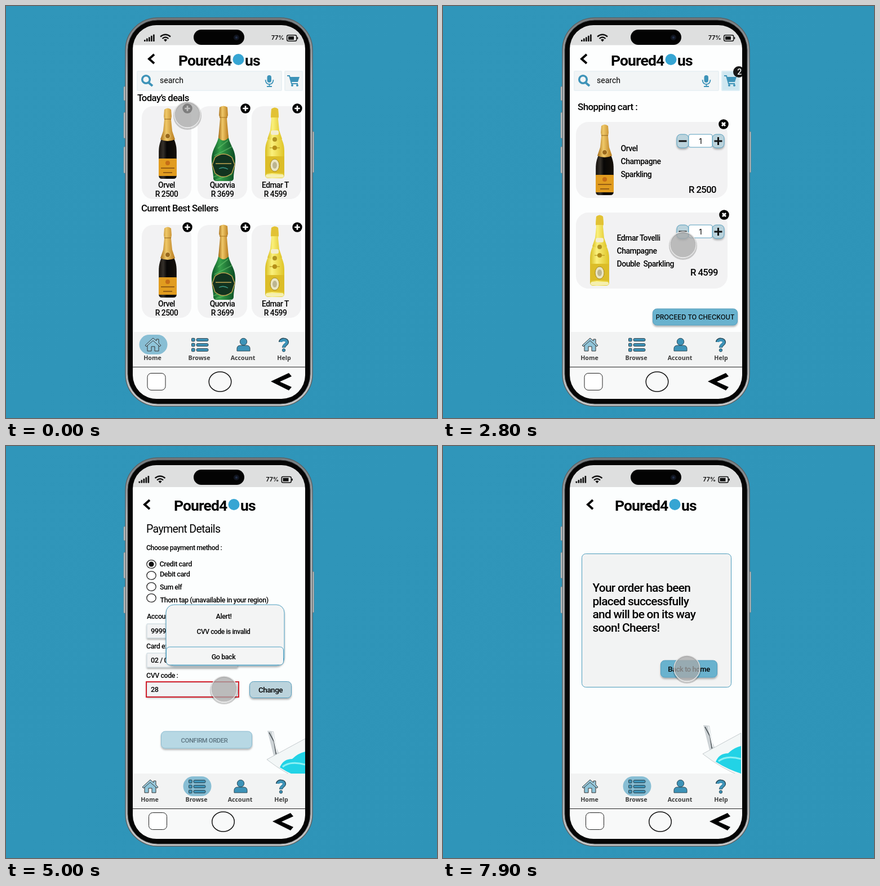
An HTML page for the animation above (8000 ms loop, 765x732 px).

```html
<!DOCTYPE html>
<html lang="en">
<head>
<meta charset="utf-8">
<style>
html, body { margin: 0; width: 100%; height: 100%; overflow: hidden; background: #2f95b9; }
svg { display: block; width: 100vw; height: 100vh; }
text { font-family: Roboto, "Liberation Sans", sans-serif; letter-spacing: -.035em; white-space: pre; }
.ui { font-family: Inter, sans-serif; letter-spacing: 0; }
.nav { font-family: "Noto Sans", sans-serif; letter-spacing: 0; }
</style>
</head>
<body>
<svg id="stage" viewBox="0 0 765 732"></svg>
<script>
const BLUE = '#3d93b8', PALE = '#bbd3dc', EDGE = '#559dbd', CARD = '#f2f2f3';

// Drawing helpers, all returning SVG markup
const rect = (x, y, w, h, r, fill, more = '') =>
  `<rect x="${x}" y="${y}" width="${w}" height="${h}" rx="${r}" fill="${fill}" ${more}/>`;
const circle = (x, y, r, fill, more = '') => `<circle cx="${x}" cy="${y}" r="${r}" fill="${fill}" ${more}/>`;
const path = (d, fill, more = '') => `<path d="${d}" fill="${fill}" ${more}/>`;
const line = (d, color, w, more = '') => path(d, 'none', `stroke="${color}" stroke-width="${w}" ${more}`);
const text = (x, y, size, str, weight = 500, more = '') =>
  `<text x="${x}" y="${y}" font-size="${size}" font-weight="${weight}" ${more}>${str}</text>`;
const mid = (x, y, size, str, weight = 500, more = '') =>
  text(x, y, size, str, weight, 'text-anchor="middle" ' + more);
const use = (id, x, y) => `<use href="#${id}" x="${x}" y="${y}"/>`;
const move = (x, y, body) => `<g transform="translate(${x} ${y})">${body}</g>`;
const stroke = (c, w = 1) => `stroke="${c}" stroke-width="${w}"`;
const SHADOW = 'filter="url(#shadow)"';

const glassBody = 'M-8 46C-15 60-17 66-17 78V119Q-17 125-11 125H11Q17 125 17 119V78C17 66 15 60 8 46Z';
const foil = 'M-6 2Q0-3 6 2L7 14 6 20 8 40 13 55Q0 61-13 55L-8 40-6 20-7 14Z';

const defs = `<defs>
<filter id="shadow" x="-30%" y="-30%" width="160%" height="170%">
  <feDropShadow dx="0" dy="2.5" stdDeviation="1.5" flood-opacity=".3"/></filter>
<linearGradient id="bg" x2="1" y2="1"><stop stop-color="#3096ba"/><stop offset="1" stop-color="#2e94b8"/></linearGradient>
<linearGradient id="metal" x2="0" y2="1"><stop stop-color="#777c7f"/><stop offset=".15" stop-color="#b3b7b9"/>
  <stop offset=".85" stop-color="#a8acae"/><stop offset="1" stop-color="#c6c8c9"/></linearGradient>
<linearGradient id="gold"><stop stop-color="#a56b16"/><stop offset=".4" stop-color="#efc868"/><stop offset="1" stop-color="#b77a1c"/></linearGradient>
<linearGradient id="dark"><stop stop-color="#15110c"/><stop offset=".25" stop-color="#35302a"/><stop offset=".45" stop-color="#080706"/><stop offset="1" stop-color="#151009"/></linearGradient>
<linearGradient id="green"><stop stop-color="#0c5427"/><stop offset=".35" stop-color="#36a04a"/><stop offset="1" stop-color="#0b4b23"/></linearGradient>
<linearGradient id="lemon"><stop stop-color="#d8bd20"/><stop offset=".35" stop-color="#faf07c"/><stop offset="1" stop-color="#dfc426"/></linearGradient>
<clipPath id="screen">${rect(225, 34, 306, 664, 42, '#000')}</clipPath>
<g id="b0">
  <g transform="scale(.93 1)">${path(glassBody, 'url(#dark)')}</g>${path(foil, 'url(#gold)')}
  ${line('M-6 19H6', '#8d5e18', 1)}${circle(0, 49, 4.5, '#9a691d', stroke('#f0cf7c'))}
  ${rect(-16, 89, 32, 31, 1, '#e19c1f')}${circle(0, 97, 4, '#c56d16')}
  ${line('M-12 106H12M-8 114H8', '#7d4a12', 1.3)}
</g>
<g id="b1">
  ${path('M-8 50C-10 70-22 75-21 98-20 114-18 118-18 128Q-18 133-12 133H12Q18 133 18 128C18 118 20 114 21 98 22 75 10 70 8 50Z', 'url(#green)')}
  ${line('M-10 75 8 61M-16 88 15 72M-18 126 16 112M-14 131 15 121', '#64c06b', 1.8, 'opacity=".6"')}
  ${path('M-7 2Q0-3 7 2L8 16 6 22 9 56Q0 66-9 56L-6 22-8 16Z', 'url(#gold)')}
  ${line('M-7 20H7', '#a97420', 1)}
  ${path('M-20 104L-15 91Q0 79 15 91L20 104 15 119Q0 132-15 119Z', '#12331f', stroke('#c2a452', 1.4))}
  ${line('M-14 102H14', '#c2a452', 1.5)}${line('M-8 111Q0 107 8 112', '#3f9f8f', 1.3)}
</g>
<g id="b2">
  ${path(glassBody, 'url(#lemon)')}${path(foil, 'url(#lemon)')}
  ${path('M-6 2Q0-3 6 2L7 17H-7Z', '#e2c235')}${rect(-7, 40, 14, 8, 3, '#f3edcf')}
  ${circle(0, 56, 4, '#b19420')}${line('M-9 71H9', '#ad8b13', 1)}${circle(0, 71, 4, '#b58f17')}
  ${rect(-17, 86, 34, 30, 0, '#dcbd28')}<ellipse cy="102" rx="8" ry="11" fill="#eae5c2" stroke="#a58a24"/>
  <ellipse cy="102" rx="4" ry="6" fill="#bcb590"/>${rect(-16, 118, 32, 6, 3, '#f5efb0')}
</g>
<g id="add">${circle(0, 0, 8.7, '#000')}${line('M-4.8 0H4.8M0-4.8V4.8', '#fff', 2.7)}</g>
<g id="del">${circle(0, 0, 8.8, '#000')}${line('M-3-3 3 3M3-3-3 3', '#fff', 3)}</g>
<g id="pour">
  ${path('M464 506L475 507 480 536 487 552 476 554Z', '#ccd2d5')}${line('M467 509L476 526 480 551', '#454d51', 1.6)}
  ${line('M473 508L481 545', '#f4f7f8', 2)}
  ${path('M463 557L531 520V597Q495 582 463 557Z', '#f3f7f7', stroke('#c3cacd'))}
  ${path('M486 571Q492 556 508 556 518 546 531 543V592Q506 584 486 571Z', '#22d3e6')}
  ${line('M491 570Q505 559 531 566', '#8cf0f4', 3)}
</g>
</defs>`;

const chevron = (x, y) => line(`M${x + 5} ${y - 8}L${x - 4} ${y}L${x + 5} ${y + 8}`, '#000', 3.9);

const status = (dx, dy) => move(dx, dy,
  [0, 1, 2, 3, 4].map(i => rect(245 + i * 4, 60 - i * 2.4, 2.7, 3 + i * 2.4, .6, '#111')).join('') +
  line('M274 54.5Q283 47 292 54.5M277.5 58Q283 53 288.5 58', '#111', 2.3) + path('M280 60Q283 57.5 286 60L283 63.5Z', '#111') +
  text(471, 60, 10.5, '77%', 600, 'class="ui"') +
  rect(498.7, 51.7, 17, 10.5, 2.5, 'none', stroke('#111', 1.5)) + rect(501, 54, 10, 6, .5, '#111') + rect(516.5, 55, 1.8, 4, .8, '#111'));

const title = (x, y) => text(x, y, 26.5, 'Poured4', 600) + circle(x + 106.5, y - 11, 10, '#36a5d3') + text(x + 118, y, 26.5, 'us', 600);

const tabs = [['Home', 260, 261], ['Browse', 343, 344], ['Account', 420.5, 421.5], ['Help', 493.5, 493]];
const icons = [
  path('M-10 0V11H-3V3H3V11H10V0L0-9Z', '#8fc5da', stroke('#333')) +
    path('M0-12L6-7V-10H10V-3L14 1 12 3 0-7.5-12 3-14 1Z', '#9acbde', stroke('#333')),
  [-9, 0, 9].map(y => rect(-14.5, y - 2.7, 5.5, 5.5, 1, BLUE, stroke('#2c3d45')) + rect(-6, y - 2.3, 21, 4.7, 2, BLUE, stroke('#2c3d45'))).join(''),
  circle(0, -5.5, 6.2, BLUE, stroke('#2c4a57')) + path('M-11.5 11V6Q-11 1-5 1H5Q11 1 11.5 6V11Z', BLUE, stroke('#2c4a57')),
  line('M-6-5C-6-11 7-11 6-4 5 0 0 0 0 5', '#2c4a57', 6) + line('M-5.5-5C-5-10 6-10 5.5-4 4.5-1 0 0 0 4.5', BLUE, 4.6) + circle(0, 9.5, 2.7, BLUE, stroke('#2c4a57'))
];

const footer = (pill, dx, late) => {
  const y = late ? 3 : 0;
  return rect(225, 579 + y, 306, 63, 0, '#f2f3f3') +
    move(dx, y, (pill < 0 ? '' : rect(tabs[pill][2] - 24.5, 584, 50, 35, 17.5, '#88bed4')) +
      tabs.map(([name, x, ix], i) => move(ix, 602, icons[i]) + mid(x, 629, 10.7, name, 600, 'class="nav" fill="#3b3b3b"')).join('')) +
    rect(225, 641 + y, 306, 60, 0, '#f8f9f9') + rect(225, 641 + y, 306, 1, 0, '#222') +
    rect(late ? 253.5 : 251, late ? 651.5 : 652.5, 32, 30, 7, '#fff', stroke('#222')) +
    `<ellipse cx="${late ? 385.5 : 380}" cy="667.5" rx="19.8" ry="17.5" fill="none" stroke="#111" stroke-width="1.5"/>` +
    path('M470 667L502 652 507 658 486 667.5 507 677 502 683Z', '#000', late ? 'transform="translate(3 0)"' : '');
};

const searchBar = (badge = 0) =>
  rect(233, 116, 256, 34, 1, '#f2f5f6', stroke('#eaf1f4', 2)) +
  rect(495, 116, 31, 34, 1, badge ? '#cfe7f0' : '#f2f5f6', stroke(badge ? '#dceef5' : '#eaf1f4', 2)) +
  circle(248.5, 130.5, 6.8, 'none', stroke(BLUE, 3.5)) + line('M253 136L260 142', BLUE, 4) +
  text(273, 137, 14, 'search', 400, 'style="letter-spacing:0"') +
  rect(463.5, 123, 7.5, 13, 3.7, BLUE) + line('M460.5 131Q461 139 467.5 139 474 139 474.5 131M467.5 139V143M463 143H472', BLUE, 1.8) +
  path('M504 126H521L518 135H506Z', BLUE) + line('M499 124H503L507 138H518', BLUE, 2) +
  circle(508, 141, 2, BLUE) + circle(517, 141, 2, BLUE) +
  (badge ? circle(525, 117, 10, '#161616') + mid(526, 122, 14, badge, 500, 'fill="#fff"') : '');

const shopPage = (body, { pill = -1, x = 298, back = 250, badge } = {}) =>
  rect(225, 69, 306, 511, 0, '#fdfefe') + rect(225, 34, 306, 35.5, 0, '#dedfdf') + status(0, 0) +
  chevron(back, 94) + title(x, 106) + searchBar(badge) + body + footer(pill, 0, false);

const payPage = (body, pill, dx, back, x, pourX, pourY) =>
  rect(225, 73, 306, 511, 0, '#fcfefe') + rect(225, 34, 306, 39, 0, '#dedfdf') + status(-9.5, 2.7) +
  chevron(back, 104) + title(x, 115) + use('pour', pourX, pourY) + body + footer(pill, dx, true);

const button = (x, y, w, h, fill, label, size, more = '') =>
  rect(x, y, w, h, 7, fill, `${stroke(EDGE)} ${SHADOW}`) + mid(x + w / 2, y + h / 2 + size * .36, size, label, 500, more);

const names = ['Orvel', 'Quorvia', 'Edmar T'], prices = ['R 2500', 'R 3699', 'R 4599'];
const shelf = (dx, dy) => move(dx, dy, [241, 340, 436, 529].map(x => rect(x, 178, 88, 165, 20, CARD)).join('') +
  names.map((name, i) => use('b' + i, [287, 386, 477][i], [182, 178, 181][i]) +
    mid([285, 384, 478][i], 323, 13.8, name) + mid([285, 384, 478][i], 339, 13.8, prices[i]) +
    use('add', [322, 425, 517][i], 182)).join(''));

const stepper = (x, y, bw, w, h) =>
  rect(x, y, bw, h, 7, PALE, `${stroke(EDGE)} ${SHADOW}`) + rect(x + bw + w, y, bw, h, 7, PALE, `${stroke(EDGE)} ${SHADOW}`) +
  rect(x + bw, y, w, h - 1, 3, '#fff', stroke(EDGE)) + mid(x + bw + w / 2, y + h / 2 + 4.5, 13.5, '1', 400, 'class="ui"') +
  line(`M${x + bw / 2 - 7} ${y + h / 2}h14M${x + bw * 1.5 + w - 7} ${y + h / 2}h14m-7-7v14`, '#111', 3);

const list = badge => shopPage(rect(237, 160, 127, 29, 8, PALE, `${stroke(EDGE)} ${SHADOW}`) +
  line('M247 170L252 175 247 180M254 170L259 175 254 180', '#111', 2.4) + text(263, 181, 16.7, 'Champagnes') +
  shelf(-1, 24) + shelf(-5, 205), { pill: 0, x: 299, back: 251, badge });

const modal = rect(251, 223.5, 264, 281, 14, '#f3f4f5', `${stroke(EDGE)} ${SHADOW}`) +
  mid(378.5, 246, 16.2, 'Add to cart?') + use('b0', 376, 253) +
  mid(376.5, 404, 14, names[0]) + mid(377, 422, 14, 'Sparkling Chamapagne') + mid(376.5, 439, 14, prices[0]) +
  stepper(267.5, 459, 25, 53, 24) + button(386, 456, 57, 30, '#80bbd2', 'Add', 12.3, 'class="ui"') +
  button(449, 455.5, 58, 30, PALE, 'Cancel', 12, 'class="ui"');

const lines = (x, y, gap, size, rows, weight) => rows.map((s, i) => text(x, y + i * gap, size, s, weight)).join('');
const basket = (heading, x2, y2, action) => text(239, 185, 17, heading) +
  rect(236, 206, 269, 135, 22, CARD) + rect(x2, y2, 269, 135, 22, CARD) +
  use('b0', 287, 211) + use('b2', 278, y2 + 5) +
  lines(315.5, 258, 23, 14, [names[0], 'Champagne', 'Sparkling']) +
  lines(308.5, y2 + 50, 23, 14, ['Edmar Tovelli', 'Champagne', 'Double  Sparkling']) +
  text(436, 332, 16.7, prices[0]) + text(439, y2 + 112, 16.7, prices[2]) +
  button(372.5, 538, 150, 29, '#69b2ce', action, 11.4, 'class="ui"');

const payment = done => {
  const off = done ? 400 : 500;
  const field = (y, value) => rect(250, y, 161, 25, 1, '#f2f3f4', `${stroke('#c4d4db')} ${SHADOW}`) + text(257, y + 17, 12.7, value);
  const change = done ? rect(432, 418, 75, 29, 0, '#7ccde1', `${stroke('#35abc9')} ${SHADOW}`) + mid(469.5, 438, 13.5, 'Change', 500, 'fill="#23697e"')
    : button(432.5, 418.5, 74, 29, PALE, 'Change', 13.5);
  const confirm = done ? rect(281, 502, 162, 30, 0, '#5fbfda', SHADOW) + mid(357, 521, 11.3, 'CONFIRM ORDER', 500, 'fill="#286c82"')
    : rect(275.5, 507, 161, 30, 7, '#b7d8e4', `${stroke('#8abbd0')} ${SHADOW}`) + mid(352, 526.5, 11.3, 'CONFIRM ORDER', 500, 'fill="#5c7480"');
  return text(249, 154, 19.6, 'Payment Details', 400) + text(249, 185, 12.3, 'Choose payment method :') +
    [210, 230, 250, 270].map(y => `<ellipse cx="258" cy="${y}" rx="8.2" ry="7.3" fill="#fff" stroke="#222" stroke-width="1.3"/>`).join('') +
    circle(258, 210, 4.6, '#111') + text(272.5, 214, 12.7, 'Credit card') + text(273, 232, 12.7, 'Debit card') +
    text(273, 255, 12.3, 'Sum elf', off) + text(273.5, 278, done ? 11.2 : 12.5, 'Thorn tap (unavailable in your region)', off) +
    text(250, 307, 12.4, 'Account number:') + field(316, '9999 - 2888 - 2888 - 2888') +
    text(249, 360, 12.4, 'Card expiry date:') + field(368, '02 / 09') +
    text(249, 412, 12.4, 'CVV code :') + field(420, done ? '289' : '28') +
    (done ? '' : rect(249, 419, 164, 27, 0, 'none', stroke('#d3202b', 2))) + change + confirm;
};

const alertBox = rect(284, 282, 210, 108, 14, '#f3f4f4', `${stroke('#4c9ec0')} ${SHADOW}`) +
  rect(284.5, 357, 208, 32, 6, '#f4f5f5', stroke('#4c9ec0')) +
  mid(386.5, 307, 12.5, 'Alert!') + mid(386, 334, 12, 'CVV code is invalid') + mid(386, 379, 12.5, 'Go back');

const success = rect(246.5, 191.5, 265, 237, 7, '#f2f3f3', stroke('#4a9bbb')) +
  lines(265.5, 259, 23.6, 20.9, ['Your order has been', 'placed successfully', 'and will be on its way', 'soon! Cheers!']) +
  button(386.5, 381, 100, 30, '#69b2ce', 'Back to home', 13);

const home = shopPage(text(233, 169, 16.7, 'Today’s deals') + text(240, 365, 16.7, 'Current Best Sellers') +
  shelf(0, 0) + shelf(0, 211), { pill: 0, x: 306, back: 258 });
const cart = shopPage(basket('Shopping cart :', 236, 367, 'PROCEED TO CHECKOUT') +
  stepper(415, 228, 21, 42, 24) + stepper(415, 389, 21, 42, 24) + use('del', 498, 210) + use('del', 499, 371), { badge: 2 });
const checkout = shopPage(basket('Checkout :', 241.5, 355, 'PROCEED TO PAYEMNT') +
  text(258, 522, 16.7, 'Total') + text(444, 521, 13, '=') + text(456, 522, 16.7, 'R 7099'), { badge: 2 });
const badPay = payPage(payment(false), 1, -5, 250, 298, 0, 0);

// Start time of each screen
const scenes = [
  [0, home], [400, list()], [750, list() + modal], [1650, list(1)], [2350, cart], [3550, checkout],
  [4500, badPay], [4800, badPay + alertBox],
  [5400, payPage(payment(true), 2, 1, 253, 298, 7, -4)],
  [6700, payPage(success, 1, 0, 261, 305, -2, -10)]
];

// Pointer path: time, x, y
const track = [
  [0, 322, 193], [250, 322, 186], [650, 321, 206], [1000, 389, 312], [1350, 413, 470], [1650, 413, 470],
  [2100, 510, 135], [2400, 510, 135], [2800, 426, 424], [3200, 445, 550], [3600, 445, 550], [4100, 434, 504],
  [4350, 445, 550], [4500, 445, 550], [4750, 357, 522], [5000, 387, 432], [5200, 386, 376], [5400, 386, 376],
  [5650, 468, 433], [5850, 468, 433], [6200, 387, 538], [6450, 370, 520], [6800, 370, 520], [7400, 433, 395], [8000, 433, 395]
];

const side = (x, y, h) => rect(x, y, 5, h, 1.5, '#c9cccd', stroke('#7b8285', .8));
stage.innerHTML = defs + rect(0, 0, 765, 732, 0, 'url(#bg)') +
  side(209, 143, 25) + side(209, 189, 46) + side(209, 250, 47) + side(541.5, 223, 73) +
  rect(212, 21, 332, 690, 57, 'url(#metal)', stroke('#5c6265', 1.4)) + rect(216, 25, 324, 682, 53, '#050505', stroke('#4a4d4f')) +
  '<g clip-path="url(#screen)">' + scenes.map(s => `<g class="scene">${s[1]}</g>`).join('') +
  `<g id="pointer">${circle(0, 2, 23.5, 'none', stroke('#00000030', 3))}${circle(0, 0, 23, '#a9a9a9', `fill-opacity=".75" ${stroke('#e9e9e9', 1.3)}`)}</g></g>` +
  rect(333, 42, 90, 27, 13.5, '#030303') + circle(409, 56, 5, '#11151f') + circle(409, 56, 2, '#23304b');

const views = [...document.querySelectorAll('.scene')], pointer = document.getElementById('pointer');

function draw() {
  const t = performance.now() % 8000;
  const current = scenes.findLastIndex(s => s[0] <= t);
  views.forEach((v, i) => v.style.display = i === current ? '' : 'none');
  const k = track.findLastIndex(p => p[0] <= t), a = track[k], b = track[k + 1];
  const u = (t - a[0]) / (b[0] - a[0]), e = u * u * (3 - 2 * u);
  pointer.setAttribute('transform', `translate(${a[1] + (b[1] - a[1]) * e} ${a[2] + (b[2] - a[2]) * e})`);
  requestAnimationFrame(draw);
}
draw();
</script>
</body>
</html>
```
